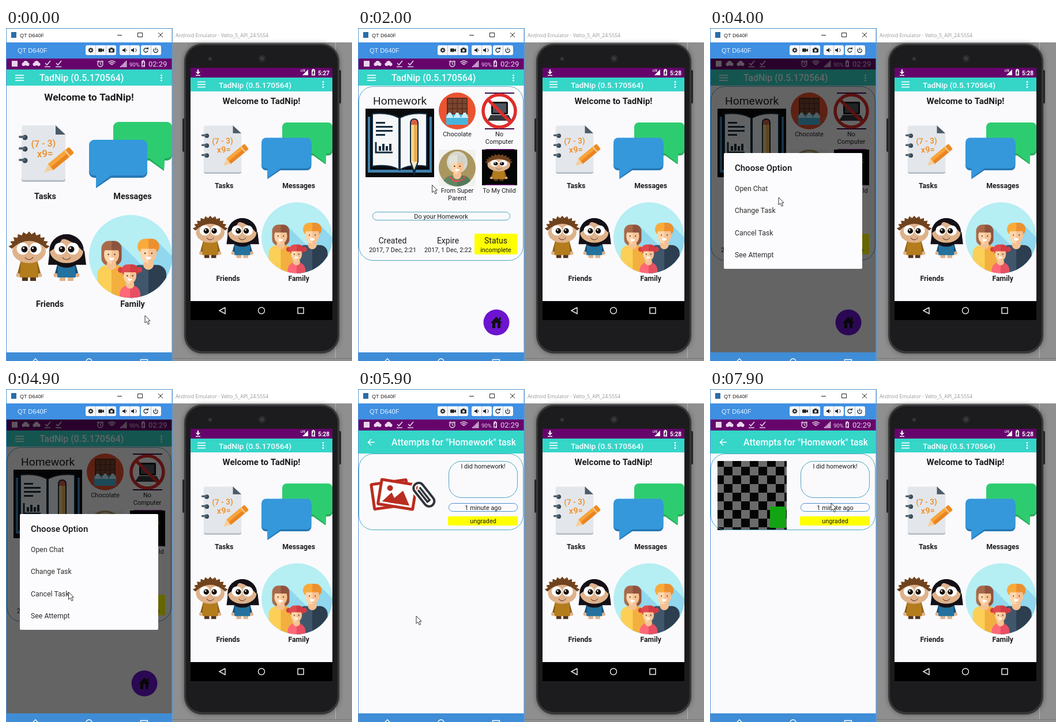
These frames come from a looping animation (600 px wide and 578 px high, 8000 ms). An HTML page with a canvas:

```html
<!DOCTYPE html>
<html>
<head>
<meta charset="utf-8">
<style>
html, body { margin: 0; width: 100%; height: 100%; overflow: hidden; background: #8f8f8f; }
canvas { display: block; width: 600px; height: 578px; }
</style>
</head>
<body>
<canvas id="stage" width="600" height="578"></canvas>
<script>
const c = document.getElementById('stage').getContext('2d');
const LOOP = 8000, STEP = 100, PI = Math.PI;
const APP = 'TadNip', DEVICE = 'QT D640F', VERSION = '(0.5.170564)';
const TEAL = '#35d5c8', PURPLE = '#66046c', PAPER = '#fafafd', INK = '#1c1c1c', RIM = '#4fa3bd';
const LILAC = '#e9d5ec', SKIN = '#dfb28b', NAVY = '#152c3f', RED = '#ba2d20', DARK = '#262626';

// Drawing helpers
function fill(color) { c.fillStyle = color; c.fill(); }
function stroke(color, w = 1) { c.strokeStyle = color; c.lineWidth = w; c.stroke(); }
function rect(x, y, w, h, color) { c.fillStyle = color; c.fillRect(x, y, w, h); }
function round(x, y, w, h, r) { c.beginPath(); c.roundRect(x, y, w, h, r); }
function panel(x, y, w, h, r, color) { round(x, y, w, h, r); fill(color); }
function pill(x, y, w, h, r, color = RIM, lw = 1) { round(x + .5, y + .5, w, h, r); stroke(color, lw); }
function arc(x, y, r, a = 0, b = 2 * PI) { c.beginPath(); c.arc(x, y, r, a, b); }
function disc(x, y, r, color) { arc(x, y, r); fill(color); }
function ring(x, y, r, color, w = 1.4) { arc(x, y, r); stroke(color, w); }
function oval(x, y, rx, ry, color, a = 0) { c.beginPath(); c.ellipse(x, y, rx, ry, 0, a, 2 * PI); fill(color); }
function path(pts) {
  c.beginPath();
  for (let i = 0; i < pts.length; i += 2) c.lineTo(pts[i], pts[i + 1]);
}
function poly(color, ...pts) { path(pts); fill(color); }
function line(color, w, ...pts) { path(pts); stroke(color, w); }
function trap(x, y, top, bottom, h, color) {
  poly(color, x - top / 2, y, x + top / 2, y, x + bottom / 2, y + h, x - bottom / 2, y + h);
}
function text(s, x, y, size, color = INK, align = 'left', weight = 400, family = 'Roboto') {
  c.font = `${weight} ${size}px ${family}, sans-serif`;
  c.fillStyle = color;
  c.textAlign = align;
  c.fillText(s, x, y);
}
const mid = (s, x, y, size, weight, color = INK) => text(s, x, y, size, color, 'center', weight);
function at(x, y, angle, fn) { c.save(); c.translate(x, y); c.rotate(angle); fn(); c.restore(); }
function clipped(shape, fn) { c.save(); shape(); c.clip(); fn(); c.restore(); }
const box = (x, y, w, h) => () => round(x, y, w, h, 0);
const sides = fn => [-1, 1].forEach(fn);
const ramp = (t, a, b) => Math.min(1, Math.max(0, (t - a) / (b - a)));
const ease = k => k * k * (3 - 2 * k);

// Flat two-tone shading: one colour left of x, another right of it
function split(x, [a, b]) {
  const g = c.createLinearGradient(x - .5, 0, x + .5, 0);
  g.addColorStop(0, a);
  g.addColorStop(1, b);
  return g;
}

function notebook() {
  panel(27, 171, 76, 96, 4, '#b4bcc5');
  panel(27, 169, 76, 95, 4, '#e3e7eb');
  poly(PAPER, 85, 168, 104, 168, 104, 186);
  poly('#4d5b68', 86, 169, 103, 185, 86, 185);
  for (let y = 190; y <= 230; y += 20) {
    disc(33, y, 4.5, '#384653');
    panel(22, y - 3, 12, 4, 2, '#566572');
  }
  at(65, 204, -.04, () => {
    mid('(7 - 3)', 0, 2, 16, 500, '#ee8a23');
    mid('x9=', 2, 20, 17, 500, '#ee8a23');
  });
  at(66, 251, -.69, () => {
    poly('#f3cf9d', 0, 0, 16, -7, 16, 7);
    rect(15, -7, 40, 14, '#ea8420');
    rect(15, -7, 40, 7, '#f8a43a');
    rect(51, -7, 3, 14, '#f7c98c');
    panel(54, -7, 8, 14, 3, '#ee8a23');
  });
}

function bubble(x, y, w, h, main, dark, from, tip) {
  for (const [color, drop] of [[dark, 4], [main, 0]]) {
    const base = y + h - 2 + drop;
    panel(x, y + drop, w, h, 9, color);
    poly(color, from, base, from + 29, base, tip, base + 22 - drop / 2);
  }
}

function bubbles() {
  bubble(186, 163, 102, 63, '#2ecc71', '#23a95b', 246, 274);
  bubble(144, 194, 101, 62, '#3498db', '#2678b4', 156, 156);
}

// Cartoon child: legs, arms and shirt, then head, hair and eyes
function kid(x, shirt, sleeve, legs, hair) {
  sides(s => rect(x + s * 7 - 5, 428, 10, 11, legs));
  trap(x, 403, 28, 42, 26, sleeve);
  sides(s => disc(x + s * 19, 429, 3.5, SKIN));
  trap(x, 402, 28, 32, 31, shirt);
  hair(false);
  oval(x, 387, 29, 21, SKIN);
  hair(true);
  sides(s => {
    disc(x + s * 11, 383, 10.5, '#fff');
    disc(x + s * 8, 384, 5.5, '#15100d');
    disc(x + s * 8 - 1.5, 382, 1.6, '#fff');
  });
  arc(x, 394, 8, .5, 2.64);
  stroke('#76482d', 1.2);
}

function boy() {
  kid(40, '#b37c1d', '#8f5f13', '#51351d', front => {
    if (!front) return;
    c.beginPath();
    for (let i = 0; i <= 22; i++) {
      const a = PI * i / 22, r = i % 2 ? 1 : .84;
      c.lineTo(40 - 36 * r * Math.cos(a), 383 - 30 * r * Math.sin(a));
    }
    c.quadraticCurveTo(40, 356, 10, 383);
    fill('#70431f');
  });
}

function girl() {
  kid(105, '#23729f', '#174f77', SKIN, front => {
    if (!front) {
      oval(105, 387, 30, 29, '#131116');
      trap(106, 387, 60, 66, 24, '#131116');
      return;
    }
    c.beginPath();
    c.moveTo(76, 388);
    c.quadraticCurveTo(92, 378, 98, 365);
    c.quadraticCurveTo(118, 370, 134, 388);
    c.bezierCurveTo(132, 348, 78, 348, 76, 388);
    fill('#131116');
  });
}

// Flat portrait sized by face radius r and shoulder width w
function person(x, y, r, w, hairTones, clothTones, long) {
  const hair = split(x, hairTones), skin = split(x, ['#ffd6ac', '#f6c294']);
  panel(x - r * 1.35, y - r * 1.8, r * 2.7, r * (long ? 3.3 : 1.9), r, hair);
  panel(x - w / 2, y + r * 1.45, w, 70, 16, split(x, clothTones));
  disc(x, y + r * 1.4, r * .65, '#f6c294');
  oval(x, y, r, r * 1.25, skin);
  oval(x, y - r * .55, r * 1.1, r * .95, hair, PI);
  sides(s => disc(x + s * r * .42, y, 1.2, '#4a332b'));
  arc(x, y + r * .45, r * .35, 0, PI);
  fill('#fff');
}

function family() {
  clipped(() => arc(216, 396.5, 72), () => {
    rect(143, 324, 146, 146, '#b5eef3');
    for (const [x, y] of [[196, 372], [258, 366]])
      poly('#91d7ee', x, y, x + 110, y + 110, x - 30, y + 110);
    person(183, 393, 13, 49, ['#a96a4c', '#8d543d'], ['#fccf57', '#f3b03e'], true);
    person(247, 391, 14, 62, ['#f8ab3a', '#ec902f'], ['#40566b', '#2c3e50']);
    sides(s => disc(215 + s * 16, 420, 5, '#d73d45'));
    person(215, 430, 11, 36, ['#e04b4f', '#cf3c43'], ['#ff6878', '#e94f63']);
  });
}

// Each picture with its top edge on the big and on the small screen
const pictures = [[notebook, 163, 164], [bubbles, 163, 164], [boy, 358, 330], [girl, 358, 330], [family, 325, 303]];
const labels = ['Tasks', 'Messages', 'Friends', 'Family'];

function home(left) {
  const s = left ? 1 : .855;
  for (const [draw, from, to] of pictures) {
    if (left) draw();
    else at(320, to - from * s, 0, () => { c.scale(s, s); draw(); });
  }
  if (left) mid(`Welcome to ${APP}!`, 144, 126, 17.3, 700);
  else mid(`Welcome to ${APP}!`, 443, 132, 15, 700);
  labels.forEach((name, i) => {
    const x = i % 2 ? 219.5 : i ? 76 : 68, row = i >> 1;
    mid(name, left ? x : 320 + x * s, left ? 297 + row * 187 : 278 + row * 161, 14.4 * s, 700);
  });
}

function appBar(x, y, h, title, size, tx, base, back) {
  const cy = base - 5.5, hx = x ? 332 : 16, w = x ? 14 : 15;
  rect(x, y, x ? 246 : 288, h, TEAL);
  if (back) {
    line('#f4ffff', 1.6, 29, cy, 18, cy);
    line('#f4ffff', 1.6, 23, cy - 5.5, 17.5, cy, 23, cy + 5.5);
  } else {
    for (const d of [-4.5, 0, 4.5]) {
      rect(hx, cy + d - .8, w, 1.7, '#f4ffff');
      disc(x ? 550 : 269.5, cy + d, 1.5, '#f4ffff');
    }
  }
  text(title, tx, base, size, '#f6ffff', 'left', 500);
}

function battery(x, y, color) {
  rect(x - 3, y - 5, 6, 10, color);
  rect(x - 1.5, y - 6.5, 3, 2, color);
  line(PURPLE, 1.3, x + 1, y - 4, x - 1, y + .5, x + 1, y, x - 1, y + 4);
}

function leftStatus() {
  rect(0, 53, 288, 19, PURPLE);
  rect(10, 57, 10, 10, LILAC);
  for (const x of [34, 53]) {
    for (const d of [-3.5, 0, 3.5]) disc(x + d, 63 - (d ? 0 : 2), d ? 3 : 4, LILAC);
  }
  for (const x of [72, 91]) {
    line(LILAC, 1.6, x - 4, 61, x - 1, 64, x + 5, 57);
    rect(x - 5, 66.5, 10, 1.4, LILAC);
  }
  ring(163.5, 62.5, 4.5, LILAC);
  line(LILAC, 1.2, 163.5, 59.5, 163.5, 63, 166, 63);
  sides(s => line(LILAC, 1.6, 163.5 + s * 5.5, 59, 163.5 + s * 2.5, 56.5));
  for (let r = 0; r <= 9; r += 3) { arc(183.5, 66, r, -2.35, -.79); stroke(LILAC, 1.4); }
  for (let i = 0; i < 5; i++) rect(198 + i * 2.4, 66 - i * 2.3, 1.7, 2 + i * 2.3, LILAC);
  text('90%', 214, 66.5, 9.5, LILAC);
  battery(238, 62.5, LILAC);
  text('02:29', 247, 67, 13, LILAC);
}

function toolButtons() {
  for (const [x, n] of [[138, 3], [197, 2], [234, 2]]) {
    panel(x, 30, n * 18 - 1, 17, 3, '#f7f9fb');
    for (let i = 1; i < n; i++) rect(x + i * 18 - 1, 30, 1, 17, '#a9c9e9');
  }
  for (let a = 0; a < 6; a += PI / 4) disc(147 + 3.6 * Math.cos(a), 38.5 + 3.6 * Math.sin(a), 1, DARK);
  ring(147, 38.5, 2.4, DARK, 1.7);
  panel(160, 35.5, 7, 6, 1, DARK);
  poly(DARK, 166, 38.5, 170, 35.5, 170, 41.5);
  panel(178, 35.5, 10, 7, 1, DARK);
  rect(181, 34, 4, 2, DARK);
  disc(183, 39, 2, '#fff');
  for (const [x, r] of [[202, 2], [217, 4]]) {
    rect(x, 37, 3, 3, DARK);
    poly(DARK, x, 38.5, x + 5, 34.5, x + 5, 42.5);
    arc(x + 5, 38.5, r, -.9, .9);
    stroke(DARK);
  }
  arc(242.5, 38.5, 3.5, .3, 5.4);
  stroke(DARK, 1.3);
  poly(DARK, 243, 36.5, 247, 37, 247, 33);
  arc(259.5, 39, 3.6, -.9, 4.04);
  stroke(DARK, 1.3);
  rect(259, 34, 1.2, 5, DARK);
}

function windowFrame() {
  rect(0, 0, 288, 25, '#fff');
  rect(9, 7, 9, 10, '#2d6da6');
  text(DEVICE, 24, 15.5, 9, '#222', 'left', 400, 'Liberation Sans');
  rect(193, 12, 8, 1, '#222');
  pill(228, 8, 8, 7, 0, '#222');
  sides(s => line('#222', 1, 268 - s * 4, 8, 268 + s * 4, 16));
  rect(0, 25, 288, 28, '#3f8fe2');
  text(DEVICE, 20, 43, 11, '#e8f3ff', 'left', 400, 'Liberation Sans');
  toolButtons();
  rect(0, 563, 288, 15, '#3f8dd6');
  line('#fff', 1.4, 47, 578, 51, 574, 55, 578);
  ring(144, 579, 5, '#fff');
  pill(233, 575, 12, 9, 0, '#fff', 1.4);
  rect(0, 0, 288, 1, '#4a92d4');
  for (const x of [0, 287.5]) rect(x, 0, 1, 578, '#5a9ad6');
}

function book() {
  rect(13, 140, 119, 119, '#0a0a0c');
  rect(17, 154, 111, 97, '#3f81ad');
  rect(21, 149, 103, 97, '#0a0a0c');
  sides(s => {
    const x = d => 72 + s * d;
    c.beginPath();
    c.moveTo(x(1), 156);
    c.quadraticCurveTo(x(18), 146, x(47), 149);
    c.lineTo(x(47), 240);
    c.quadraticCurveTo(x(17), 236, x(1), 246);
    c.closePath();
    fill('#f4f6f8');
    stroke(NAVY, 2);
  });
  for (let i = 0; i < 4; i++) {
    rect(31, 163 + i * 7, i % 3 ? 29 : 16, 3, NAVY);
    rect(36 + i * 6, 213 - 8 - i % 2 * 4, 4, 8 + i % 2 * 4, NAVY);
  }
  line(NAVY, 3, 31, 198, 31, 216, 60, 216);
  // pencil
  panel(90, 157, 15, 76, [7, 7, 0, 0], NAVY);
  poly(NAVY, 90, 232, 105, 232, 97.5, 257);
  panel(92, 159, 11, 12, [5, 5, 0, 0], '#d85f45');
  rect(92, 168, 11, 64, split(97, ['#f7d58c', '#e7ad52']));
  poly('#f1e4c6', 92, 232, 103, 232, 97.5, 246);
}

function chocolate() {
  disc(172, 144, 32, '#ea5430');
  panel(154, 121, 36, 31, 2, '#5b2e20');
  for (let i = 0; i < 12; i++) rect(156 + i % 4 * 8.5, 123 + (i >> 2) * 9, 7, 7.5, '#7c4630');
  rect(153, 150, 38, 18, '#46b5dc');
  for (let i = 0; i < 3; i++) trap(159 + i * 13, 147, 4, 13, 9, '#c9eef9');
}

function noComputer() {
  for (const y of [112, 174]) rect(220, y, 51, 2, '#3d0b45');
  panel(231, 128, 29, 22, 2, '#151515');
  rect(234, 131, 23, 16, '#4d5660');
  trap(245.5, 151, 31, 43, 10, '#34383c');
  ring(245, 144, 28, '#dd2d2b', 5.5);
  line('#dd2d2b', 5.5, 225, 124, 265, 164);
}

function grandma() {
  rect(140, 211, 64, 64, '#f1f2ef');
  clipped(() => arc(172, 243, 32), () => {
    rect(140, 211, 64, 64, '#aa965f');
    oval(172, 233, 18, 19, '#d6d8cd');
    person(172, 240, 11, 50, ['#e1e2d9', '#d0d2c7'], ['#5d8764', '#537a5a']);
    for (let i = -3; i <= 3; i++) disc(172 + i * 4, 266 - i * i * .7, 2, '#e04f54');
  });
}

function homework() {
  pill(1, 101, 285, 302, 25);
  text('Homework', 26, 133, 19.2);
  book();
  chocolate();
  noComputer();
  grandma();
  rect(215, 211, 61, 62, '#050505');
  for (const y of [210, 271.5]) rect(221, y, 50, 1.5, '#6c1477');
  at(217, 219 - 354 * .55, 0, () => { c.scale(.68, .55); boy(); });
  [['Chocolate', 'No', 'From Super', 'To My Child'], ['', 'Computer', 'Parent', '']].forEach((row, j) =>
    row.forEach((s, i) => mid(s, 172 + i % 2 * 73, 188 + (i >> 1) * 98 + j * 13, 11)));
  pill(25, 319, 238, 14, 7);
  mid('Do your Homework', 144, 331, 11);
  panel(202, 357, 74, 36, 2, '#ffff00');
  [['Created', '2017, 7 Dec, 2:21', 60], ['Expire', '2017, 1 Dec, 2:22', 156], ['Status', 'incomplete', 239]]
    .forEach(([head, value, x]) => { mid(head, x, 373.5, 14); mid(value, x, 389, 10.8); });
  disc(240, 511, 22.5, '#6c14d0');
  poly('#111', 230, 512, 240, 501, 250, 512);
  rect(245, 502, 2.5, 5, '#111');
  sides(s => rect(240 + s * 4.5 - 2.5, 510, 5, 11, '#111'));
}

function dialog(alpha) {
  c.save();
  c.globalAlpha = alpha;
  panel(24, 217, 240, 201, 2, '#fcfcfe');
  text('Choose Option', 43, 248, 15, '#111', 'left', 500);
  ['Open Chat', 'Change Task', 'Cancel Task', 'See Attempt'].forEach((s, i) =>
    text(s, 43, 283 + i * 38.3, 12.3, '#2c2c2c'));
  c.restore();
}

function photoIcon() {
  for (const [x, a] of [[56, -.14], [68, .16]]) at(x, 183, a, () => {
    panel(-33, -24, 66, 48, 4, RED);
    rect(-28, -19, 56, 38, '#fff');
    poly(RED, -24, 16, -10, -2, 2, 16);
    poly(RED, -12, 16, 9, -8, 24, 16);
    disc(-14, -9, 5, RED);
  });
  at(114, 183, -.67, () => {
    pill(-9.5, -23.5, 18, 47, 9, PAPER, 9);
    pill(-9.5, -23.5, 18, 47, 9, '#30343b', 4);
    line('#30343b', 3.5, -3, -12, -3, 14, 2, 14, 2, -14);
  });
}

function checker() {
  clipped(box(13, 125, 120, 120), () => {
    for (let i = 0; i < 81; i++)
      rect(9 + i % 9 * 15, 120 + Math.floor(i / 9) * 15, 15, 15, i % 2 ? '#6b6b6b' : '#050505');
    rect(104, 204, 28, 37, '#12a412');
  });
}

function attempts(loaded) {
  if (loaded) checker(); else photoIcon();
  pill(1, 112, 285, 132, 25);
  pill(157, 125, 119, 63, 22);
  pill(157, 198, 119, 14, 7, '#4c8fd0');
  panel(156, 221, 121, 16, 2, '#ffff00');
  mid('I did homework!', 217, 137.5, 10.9);
  mid('1 minute ago', 217, 210, 10.9);
  mid('ungraded', 217, 233, 10.9);
}

function phoneBody() {
  for (const [x, y] of [[306, 157], [576, 73]]) panel(x, y, 5, 58, 2, '#2c2c2e');
  c.save();
  c.shadowColor = 'rgba(0,0,0,.4)';
  c.shadowBlur = 8;
  panel(309, 27, 269, 538, 31, '#37383a');
  c.restore();
  panel(312, 30, 263, 531, 28, '#1c1c1e');
  disc(444, 53, 6.5, '#29292d');
  disc(444, 53, 3, '#3a3a42');
  disc(354, 53.5, 3.2, '#34343a');
}

function emulator(t) {
  rect(289, 0, 311, 578, '#8f8f8f');
  rect(289, 0, 311, 25, '#fff');
  text('Android Emulator - Velto_5_API_24:5554', 294, 16, 8.7, '#969696', 'left', 400, 'Open Sans');
  rect(571, 25, 1, 548, '#b8b8b8');
  rect(289, 573, 311, 1, '#777');
  phoneBody();
  rect(320, 69, 246, 405, PAPER);
  rect(320, 69, 246, 17, PURPLE);
  rect(332, 72, 2, 6, '#fff');
  poly('#fff', 329, 76, 337, 76, 333, 80.5);
  rect(329, 81.5, 8, 1.4, '#fff');
  text('LTE', 511, 76, 5, '#fff', 'left', 700);
  poly('#fff', 514, 82, 524, 82, 524, 72);
  battery(533, 77.5, '#fff');
  text(t < 700 ? '5:27' : '5:28', 541, 82, 10, '#fff', 'left', 700);
  appBar(320, 86, 24, `${APP} ${VERSION}`, 13.7, 369, 103.5);
  clipped(box(320, 110, 246, 364), () => home(false));
  rect(320, 474, 246, 33, '#000');
  line('#eee', 1.5, 380, 485, 380, 496, 370, 490.5, 380, 485);
  ring(443, 490.5, 5.5, '#eee');
  pill(505.5, 485, 10, 10, 0, '#eee', 1.5);
}

// Pointer: each move starts at its time and takes 900 ms
const moves = [[100, 132, 265], [1700, 119, 294], [4400, 101, 394], [6300, 210, 198]];

function pointer(t) {
  let x = 241, y = 499;
  for (const [start, toX, toY] of moves) {
    const k = ease(ramp(t, start, start + 900));
    x += (toX - x) * k;
    y += (toY - y) * k;
  }
  at(x, y, 0, () => {
    path([0, 0, 0, 13, 3, 10.3, 5.3, 15.5, 7.6, 14.5, 5.3, 9.5, 9, 9.2]);
    c.closePath();
    fill('#fff');
    stroke('#333');
  });
}

function leftScreen(t) {
  rect(0, 53, 288, 510, PAPER);
  leftStatus();
  if (t >= 5800) {
    attempts(t >= 7000);
    appBar(0, 72, 40, 'Attempts for "Homework" task', 15.9, 58, 98, true);
    return;
  }
  if (t < 2000) home(true); else homework();
  appBar(0, 72, 28, `${APP} ${VERSION}`, 15.9, 58, 92);
  const open = ramp(t, 3400, 3700);
  rect(0, 53, 288, 510, `rgba(0,0,0,${.6 * open * (1 - ramp(t, 5550, 5850))})`);
  dialog(open * (1 - ramp(t, 5500, 5690)));
}

function draw(t) {
  emulator(t);
  clipped(box(0, 53, 288, 510), () => leftScreen(t));
  windowFrame();
  pointer(t);
}

let last = -1;
function tick(now) {
  const t = Math.floor(now % LOOP / STEP) * STEP;
  if (t !== last) draw(last = t);
  requestAnimationFrame(tick);
}
draw(0);
requestAnimationFrame(tick);
</script>
</body>
</html>
```
